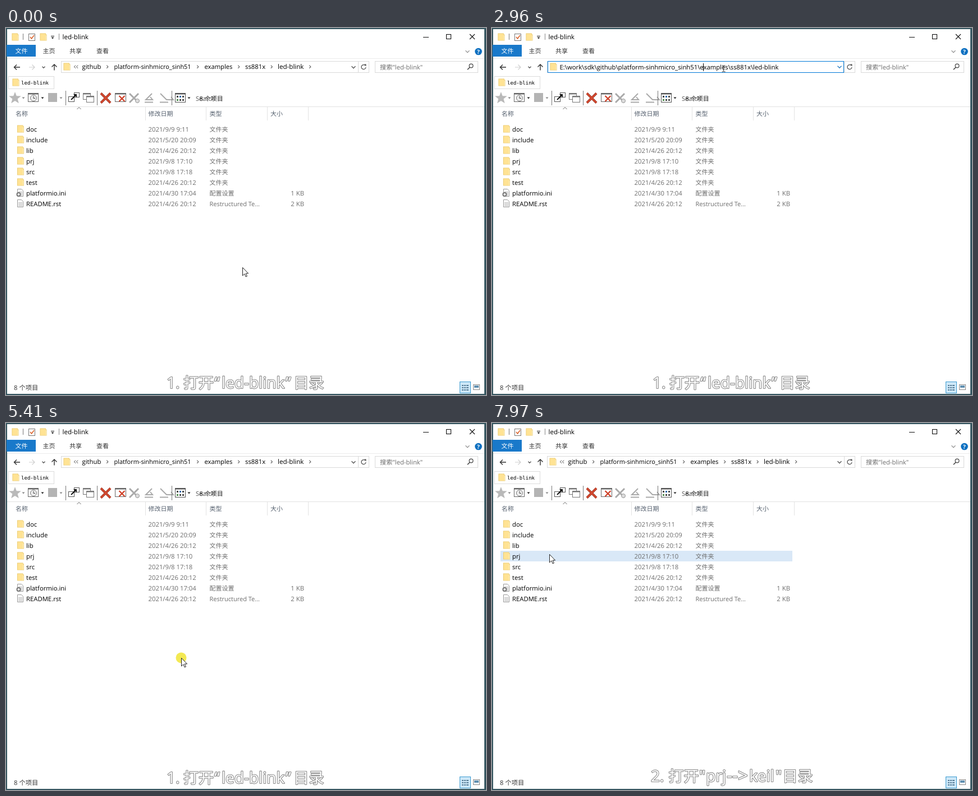
An HTML page that plays this animation: 855 px wide and 655 px high, repeating every 8000 ms.

```html
<!DOCTYPE html>
<html lang="zh-CN">
<head>
<meta charset="utf-8">
<title>led-blink</title>
<style>
  html, body { margin: 0; width: 100%; height: 100%; overflow: hidden; background: #fff; }
  svg { display: block; position: absolute; left: 0; top: 0; }
  text {
    font-family: "Open Sans", "Noto Sans CJK SC", "Noto Sans CJK", sans-serif;
    text-rendering: geometricPrecision;
    white-space: pre;
  }
  .mono { font-family: "DejaVu Sans Mono", monospace; }
  .caption text { fill: #fff; stroke: #8c8c8c; stroke-width: 2.2px; stroke-linejoin: round; paint-order: stroke; }
</style>
</head>
<body>
<svg id="stage" width="855" height="655" viewBox="0 0 855 655"></svg>
<script>
const stage = document.getElementById('stage');

const text = (x, y, s, fill = '#000', size = 11.3, extra = '') =>
  `<text x="${x}" y="${y}" fill="${fill}" font-size="${size}" ${extra}>${s}</text>`;
const rect = (x, y, w, h, fill = 'none', stroke = 'none', extra = '') =>
  `<rect x="${x}" y="${y}" width="${w}" height="${h}" fill="${fill}" stroke="${stroke}" ${extra}/>`;
const line = (d, stroke = '#444', width = 1, fill = 'none') =>
  `<path d="${d}" fill="${fill}" stroke="${stroke}" stroke-width="${width}"/>`;
const shape = (d, fill) => `<path d="${d}" fill="${fill}"/>`;
const group = (id, body, extra = '') => `<g id="${id}" ${extra}>${body}</g>`;

const caret = (x, y, fill = '#222') => shape(`M${x - 2.5} ${y - 1.5}h5l-2.5 3z`, fill);
const chevronRight = x => line(`M${x - 1.2} 66.5l2.5 2.7l-2.5 2.7`, '#555', 1.1);
const chevronDown = (x, y, color, r = 3.5) => line(`M${x - r} ${y - r / 2}l${r} ${r}l${r} ${-r}`, color, 1.3);
const cross = (x, y, r, color, w) => line(`M${x - r} ${y - r}l${2 * r} ${2 * r}M${x + r} ${y - r}l${-2 * r} ${2 * r}`, color, w);
const folder = (x, y) =>
  shape(`M${x} ${y}h10.5v2h1.5v11h-12z`, '#e9c767') +
  rect(x + .8, y + .8, 9.2, 11.6, '#ffe394') + rect(x + 10, y + 3, 1.4, 9.4, '#fff0bd');

const PATH = 'E:\\work\\sdk\\github\\platform-sinhmicro_sinh51\\examples\\';
const PATH_END = 'ss881x\\led-blink';

const crumbs = [
  [135.5, 'github', 11.3, 180.5], [192.5, 'platform-sinhmicro_sinh51', 10.95, 341.5],
  [353.5, 'examples', 11.2, 414.5], [426, 'ss881x', 11.3, 473], [484, 'led-blink', 11.6, 541.5]
];

const files = [
  ['doc', '2021/9/9 9:11'], ['include', '2021/5/20 20:09'], ['lib', '2021/4/26 20:12'],
  ['prj', '2021/9/8 17:10'], ['src', '2021/9/8 17:18'], ['test', '2021/4/26 20:12'],
  ['platformio.ini', '2021/4/30 17:04', '配置设置', '1 KB'],
  ['README.rst', '2021/4/26 20:12', 'Restructured Te...', '2 KB']
];
const ROW_TOP = 171, ROW_H = 19;

function titleBar() {
  return folder(10.5, 9.5) + rect(30, 10, 1, 11, '#777') +
    rect(40.5, 10.5, 11, 12, '#fff', '#777') + line('M43 16l2.5 3l4.5-6', '#d9622b', 1.6) +
    folder(60.5, 9.5) + rect(80, 14, 6, 1, '#222') + caret(83, 18) + rect(94, 10, 1, 11, '#888') +
    text(100.5, 20, 'led-blink', '#000', 11.6) +
    line('M743 16.5h10', '#111') + rect(784.5, 11.5, 8, 8, 'none', '#111', 'stroke-width="1.1"') +
    cross(830.5, 15.5, 4.5, '#111', 1.1);
}

function ribbon() {
  return rect(1, 30, 52, 21, '#1979ca') + text(16.5, 45, '文件', '#fff', 11) +
    [[65.5, '主页'], [113, '共享'], [161, '查看']].map(([x, s]) => text(x, 45, s, '#333', 11)).join('') +
    rect(2, 54, 850, 1, '#ebebeb') + chevronDown(822, 42, '#999') +
    '<circle cx="841.5" cy="42" r="6.3" fill="#0c6fc0"/>' +
    text(841.5, 46, '?', '#fff', 10, 'text-anchor="middle" font-weight="700"');
}

function addressRow() {
  const back = 'M25 70h-10.5m4.5-4.5l-4.5 4.5l4.5 4.5';
  return line(back, '#333', 1.4) + line('M41 70h10m-4.5-4.5l4.5 4.5l-4.5 4.5', '#d0d0d0', 1.2) +
    chevronDown(67, 70, '#555', 2.5) + line('M86 75.5v-10.5m-4.5 4.5l4.5-4.5l4.5 4.5', '#333', 1.4) +
    rect(98.5, 59.5, 548, 20, '#fff', '#d9d9d9') + rect(627, 60, 1, 19, '#d9d9d9') +
    line('M640 67a4 4 0 1 0 1 3', '#555', 1.3) + shape('M638 64.5h3.5v4z', '#555') +
    rect(657.5, 59.5, 183, 20, '#fff', '#d9d9d9') + text(666, 73.5, '搜索"led-blink"', '#6d6d6d', 11.2) +
    '<circle cx="828.5" cy="67.5" r="3.4" fill="none" stroke="#444" stroke-width="1.2"/>' +
    line('M826 70.2l-4 4', '#444', 1.6);
}

function addressModes() {
  const browse = folder(102.5, 62.5) + line('M124 66.5l-2.5 2.7l2.5 2.7M128 66.5l-2.5 2.7l2.5 2.7', '#444') +
    crumbs.map(([x, s, size, sep]) => text(x, 73, s, '#000', size) + chevronRight(sep)).join('') +
    chevronDown(619, 70, '#555');
  const edit = rect(99.5, 59.5, 527, 20, '#fff', '#0078d7') + folder(103.5, 62.5) +
    chevronDown(619, 69.5, '#2a7fc4') + text(120.5, 73.5, PATH + PATH_END) +
    rect(376, 63, 1, 14, '#000', 'none', 'id="insertion"') +
    rect(0, 62, 0, 15, '#3297fd', 'none', 'id="selection"') +
    `<clipPath id="selected">${rect(0, 62, 0, 15, '#000', 'none', 'id="selectedBox"')}</clipPath>` +
    `<g clip-path="url(#selected)">${text(120.5, 73.5, PATH + PATH_END, '#fff')}</g>`;
  return group('browse', browse) + group('edit', edit);
}

function toolbar() {
  const win = (x, y, w, h, color) => rect(x, y, w, h, '#fff', color) + rect(x, y, w, 2, color);
  const bin = (x, dir) => line(`M${x - 7} 132.5h15M${x + 6 * dir} 117l${-11 * dir} 11h12l-4-5`, '#aaa', 2);
  return rect(4.5, 86.5, 81, 22, '#fff', '#dcdcdc') + folder(11.5, 90.5) +
    text(27, 101, 'led-blink', '#000', 9.05, 'class="mono"') +
    shape('M16 114l2.8 7.2l8 .4l-6.2 5l2.2 7.7l-6.8-4.4l-6.8 4.4l2.2-7.7l-6.2-5l8-.4z', '#b9b9b9') + caret(31, 125, '#888') +
    win(39.5, 116.5, 18, 15, '#666') + '<circle cx="49" cy="125" r="5.5" fill="#eee" stroke="#777"/>' +
    line('M49 121.5v4h3', '#444') + caret(65, 125) +
    rect(75, 116, 16, 16, '#b4b4b4') + caret(98, 125, '#888') +
    rect(106, 112, 1, 26, '#777') +
    rect(111.5, 122.5, 10, 9, '#fff', '#555') + rect(121.5, 115.5, 9, 8, '#fff', '#555') +
    line('M116 128l8-8', '#111', 2) + shape('M120 118h6v6z', '#111') +
    win(137.5, 116.5, 13, 11, '#777') + win(143.5, 121.5, 13, 11, '#777') +
    rect(162, 112, 1, 26, '#777') +
    cross(177.5, 125, 8.5, '#8d2b1c', 4) + cross(177.5, 125, 8.5, '#d5492f', 2.6) +
    win(194.5, 116.5, 19, 15, '#666') + cross(206.5, 126, 5, '#d0432b', 2.4) +
    cross(228, 125, 8, '#aaa', 3) + '<circle cx="234" cy="130" r="3.5" fill="#ddd" stroke="#999"/>' +
    bin(254, 1) + bin(281, -1) +
    rect(295, 112, 1, 26, '#777') + win(301.5, 116.5, 18, 16, '#555') +
    [304, 309, 314].map((x, i) => rect(x, 121, 3, 3, i == 1 ? '#2b6cb0' : '#444') + rect(x, 127, 3, 3, i ? '#444' : '#4b8b4b')).join('') +
    caret(326, 125) + text(338, 129.5, 'Search', '#555', 11) + text(344.5, 130, '8 个项目', '#222', 11) +
    rect(2, 140, 850, 1, '#e2e2e2') + line('M126.500 145l3.500-3.500l3.500 3.500', '#666');
}

function list() {
  const heads = [[17, '名称'], [253.5, '修改日期'], [362.5, '类型'], [471, '大小']]
    .map(([x, s]) => text(x, 157, s, '#56616f', 11)).join('');
  const bars = [248, 356, 465, 538].map(x => rect(x, 141, 1, 24, '#e3e3e3')).join('');
  const rows = files.map(([name, date, type = '文件夹', size = ''], i) => {
    const top = ROW_TOP + ROW_H * i, base = top + 13.5, gray = '#6d6d6d';
    let icon = folder(20, top + 2.500);
    if (i > 5) {
      icon = line(`M20.500 ${top + 2.5}h7l3 3v10h-10z`, '#999', 1, '#fff') +
        [7, 9, 11, 13].map(d => rect(22, top + d, 7, 1, '#bbb')).join('');
      if (i == 6) icon += `<circle cx="22.500" cy="${top + 12}" r="3" fill="#fff" stroke="#777" stroke-width="2"/>`;
    }
    return icon + text(36, base, name) + text(253.5, base, date, gray) +
      text(362.5, base, type, gray, 11) + text(531, base, size, gray, 11.3, 'text-anchor="end"');
  }).join('');
  return heads + bars + rect(15, 0, 520, ROW_H, '#e5f3fd', 'none', 'id="hover"') + rows;
}

function statusBar() {
  return text(14, 645.5, '8 个项目', '#333') +
    rect(808.5, 631.5, 19, 20, '#cde8f8', '#3a9ad0') +
    [637, 641, 645].map(y => rect(812, y, 3, 2, '#5b7f98') + rect(816, y, 3, 2, '#5b7f98') + rect(820, y, 4, 2, '#5b7f98')).join('') +
    rect(832.5, 636.5, 11, 9, '#fff', '#888') + rect(834, 638, 8, 4, '#5f8fb0');
}

const caption = (id, y, parts) =>
  group(id, parts.map(([x, s, size]) => text(x, y, s, '#fff', size)).join(''), 'class="caption"');

stage.innerHTML =
  rect(0, 0, 855, 655, '#34555f') + rect(2, 2, 850, 651, '#fff') +
  titleBar() + ribbon() + addressRow() + addressModes() + toolbar() + list() + statusBar() +
  caption('first', 642.5, [[286, '1.', 28], [316, '打开', 27], [371, '“', 28], [384, 'led-blink', 28], [498, '”', 28], [512.5, '目录', 27]]) +
  caption('second', 639.5, [[283, '2.', 28], [314.5, '打开', 27], [369, '"', 28], [381, 'prj', 28.5], [418, '--&gt;', 31], [458, 'keil', 28.5], [505, '"', 28], [517.5, '目录', 27]]) +
  group('cursor',
    '<circle id="press" r="9.5" fill="#f0e428" opacity=".8"/>' +
    '<path id="arrow" d="M.5.5V15l3.400-3.200L6.200 17l2.200-1l-2.300-5h4.500z" fill="#fff" stroke="#222"/>' +
    '<path id="beam" d="M-3-5.500h2.500l.5.5l.5-.5h2.500M-3 5.500h2.500l.5-.5l.5.5h2.500M0-5v10" fill="none" stroke="#333"/>');

const el = id => document.getElementById(id);
const show = (id, on) => el(id).setAttribute('display', on ? 'inline' : 'none');

// Pointer way points: [tick, x, y]
const route = [
  [-1, 421, 427], [4, 470, 300], [8, 578, 85], [10, 595, 63], [11, 595, 63],
  [15, 440, 74], [18, 376, 78], [20, 376, 78], [21, 376, 75], [25, 376, 75],
  [31, 410, 73], [37, 426, 70], [40, 424, 68], [43, 480, 73], [45, 527.5, 77],
  [47, 539.5, 76], [51, 539.5, 76], [52, 533, 150], [54, 505, 372], [58, 390, 413],
  [62, 312, 419], [82, 312, 419], [84, 336, 427], [88, 299, 407], [90, 299, 407],
  [91, 270, 390], [93, 172, 338], [94, 133, 289], [96, 102, 234]
];
const clicks = [[10, 12], [21, 23], [41, 49], [68, 71], [104, 106]];
const LOOP = 8000, START = 790, TICK = 67.74;

function pointer(k) {
  const i = route.findIndex(p => p[0] > k);
  if (i < 0) return route[route.length - 1].slice(1);
  if (!i) return route[0].slice(1);
  const [t0, x0, y0] = route[i - 1], [t1, x1, y1] = route[i];
  const f = (k - t0) / (t1 - t0);
  return [x0 + (x1 - x0) * f, y0 + (y1 - y0) * f];
}

function render(k) {
  const [x, y] = pointer(k);
  const editing = k >= 12 && k < 68;
  const beam = k >= 12 && k < 52;
  el('cursor').setAttribute('transform', `translate(${x} ${y})`);
  show('arrow', !beam);
  show('beam', beam);
  show('press', clicks.some(([a, b]) => k >= a && k < b));
  show('browse', !editing);
  show('edit', editing);
  show('insertion', k >= 21 && k < 41);

  let from = 120, to = 120;
  if (k < 21) to = 511;
  else if (k >= 41) { from = 424; to = Math.min(511, Math.max(424, x)); }
  for (const id of ['selection', 'selectedBox']) {
    el(id).setAttribute('x', from);
    el(id).setAttribute('width', to - from);
  }

  const row = Math.floor((y - ROW_TOP) / ROW_H);
  show('hover', !beam && row >= 0 && row < files.length && x < 535);
  el('hover').setAttribute('y', ROW_TOP + ROW_H * row);
  el('hover').setAttribute('fill', k >= 104 ? '#d9e8f7' : '#e5f3fd');
  show('first', k < 95);
  show('second', k >= 95);
}

let last = null;
function frame() {
  const t = performance.now() % LOOP;
  const k = Math.max(-1, Math.floor((t - START) / TICK + .2));
  if (k !== last) render(last = k);
  requestAnimationFrame(frame);
}
frame();
</script>
</body>
</html>
```
